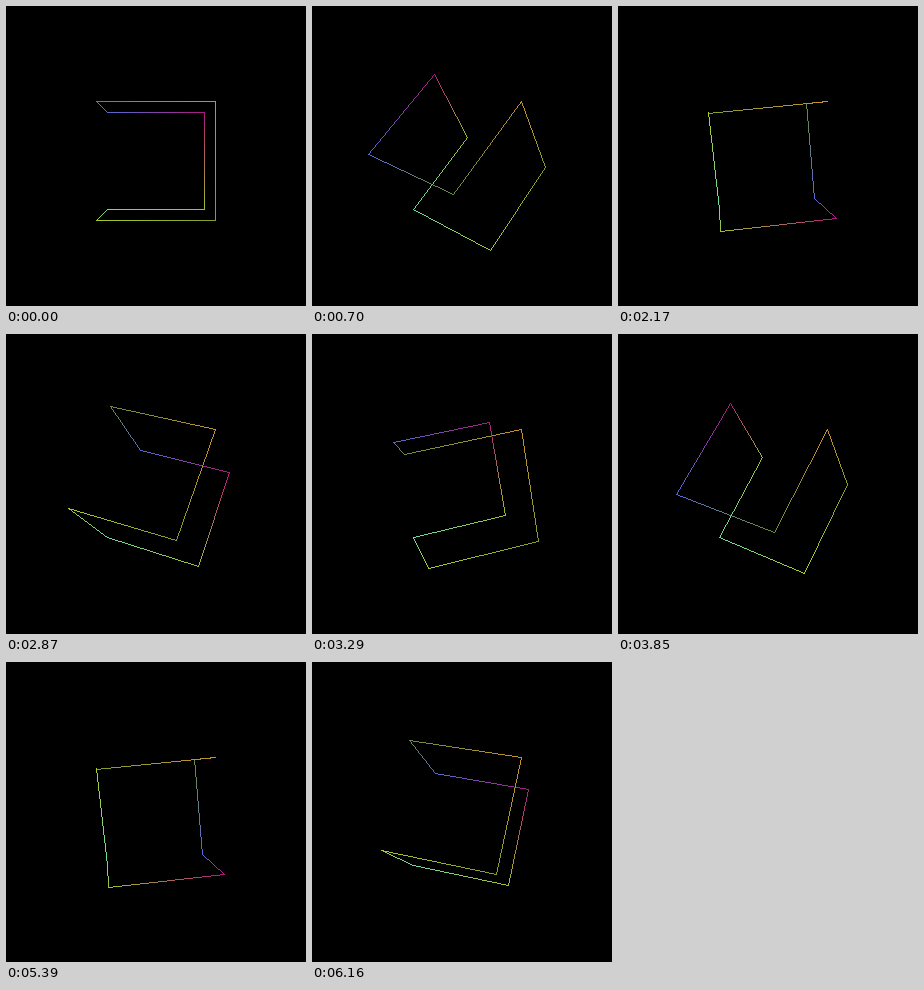
An HTML page with a canvas for the animation above (6230 ms loop, 300 by 300 pixels).

```html
<!DOCTYPE html>
<html lang="en">
<head>
<meta charset="utf-8">
<title>Cube loop</title>
<style>
  html, body { margin: 0; width: 100%; height: 100%; overflow: hidden; background: #000; }
  canvas { display: block; width: 100vmin; height: 100vmin; image-rendering: pixelated; }
</style>
</head>
<body>
<canvas id="stage" width="300" height="300"></canvas>
<script>
const ctx = document.getElementById('stage').getContext('2d');

const TICK = 70;
const TICKS = 89;
const STEP = -Math.PI / 18;
// Ticks on which the cube pauses instead of turning.
const PAUSES = [2, 6, 9, 18, 23, 28, 33, 38, 43, 48, 52, 58, 62, 66, 72, 76, 83, 87];

const CENTER = { x: 149.7, y: 155.1 };
const FOCAL = 534;
const DISTANCE = 9.98;

// A closed walk over all cube corners: x, y, z and colour.
const CORNERS = [
  { at: [1, -1, -1], rgb: [172, 26, 125] },
  { at: [-1, -1, -1], rgb: [86, 106, 212] },
  { at: [-1, -1, 1], rgb: [106, 140, 56] },
  { at: [1, -1, 1], rgb: [198, 146, 40] },
  { at: [1, 1, 1], rgb: [134, 156, 46] },
  { at: [-1, 1, 1], rgb: [168, 204, 36] },
  { at: [-1, 1, -1], rgb: [106, 218, 168] },
  { at: [1, 1, -1], rgb: [164, 190, 40] }
];

const mix = (a, b, k) => a + (b - a) * k;

// Turns a point about the diagonal (1, -1, 1).
function rotate([x, y, z], angle) {
  const c = Math.cos(angle);
  const s = Math.sin(angle) / Math.sqrt(3);
  const along = (x - y + z) / 3 * (1 - c);
  return [
    x * c + (-z - y) * s + along,
    y * c + (x - z) * s - along,
    z * c + (y + x) * s + along
  ];
}

function project([x, y, z]) {
  const scale = FOCAL / (DISTANCE - z);
  return { x: Math.floor(CENTER.x + x * scale), y: Math.floor(CENTER.y + y * scale) };
}

// Hard-edged one pixel line that blends between two colours.
function drawLine(p, q, from, to) {
  const length = Math.max(Math.abs(q.x - p.x), Math.abs(q.y - p.y), 1);
  for (let i = 0; i <= length; i++) {
    const k = i / length;
    const rgb = from.map((v, n) => Math.round(mix(v, to[n], k)));
    ctx.fillStyle = `rgb(${rgb})`;
    ctx.fillRect(Math.round(mix(p.x, q.x, k)), Math.round(mix(p.y, q.y, k)), 1, 1);
  }
}

function render(now) {
  const tick = Math.floor(now / TICK) % TICKS;
  const turns = tick - PAUSES.filter(pause => pause <= tick).length;
  const points = CORNERS.map(corner => project(rotate(corner.at, turns * STEP)));

  ctx.fillStyle = '#000';
  ctx.fillRect(0, 0, 300, 300);
  CORNERS.forEach((corner, i) => {
    const next = (i + 1) % CORNERS.length;
    drawLine(points[i], points[next], corner.rgb, CORNERS[next].rgb);
  });
}

function loop() {
  render(performance.now());
  requestAnimationFrame(loop);
}
loop();
</script>
</body>
</html>
```
